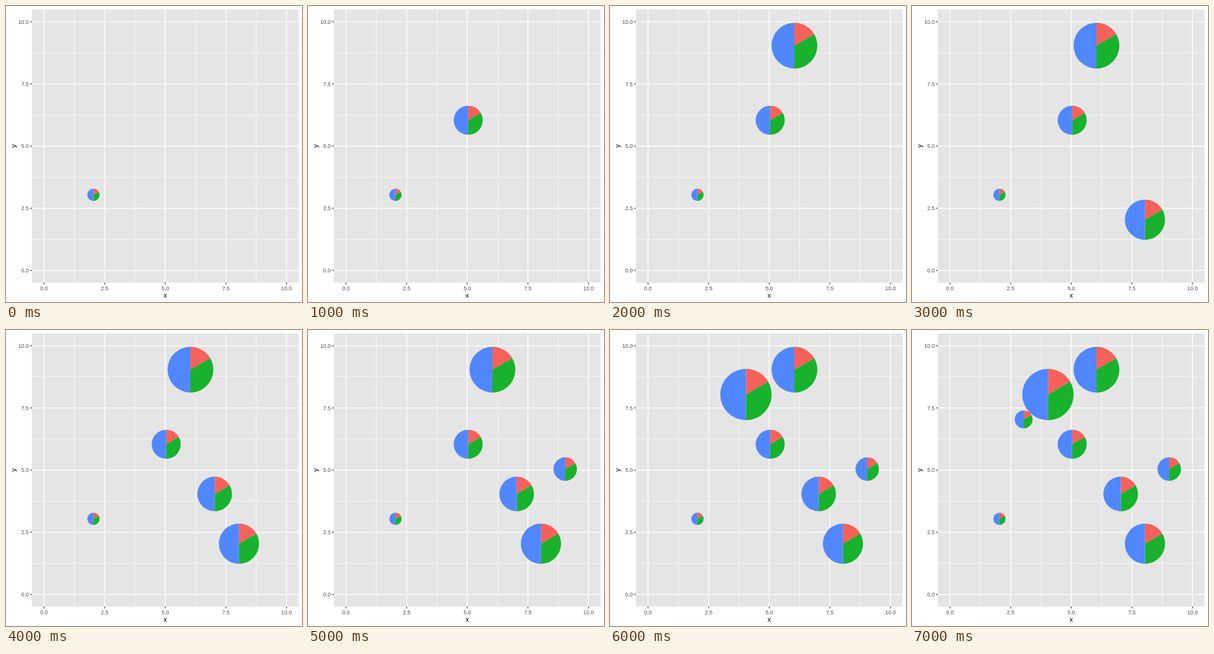
An HTML page that plays this animation: 480x480 px, repeating every 8 s.

```html
<!DOCTYPE html>
<html lang="en">
<head>
<meta charset="utf-8">
<title>Scatter of pies</title>
<style>
  html, body { margin: 0; width: 100%; height: 100%; overflow: hidden; background: #fff; }
  svg { display: block; width: 100vw; height: 100vh; }
  text { font-family: "Liberation Sans", Arial, sans-serif; font-size: 8.8px; fill: #4d4d4d; }
  .title { font-size: 11px; fill: #000; text-anchor: middle; }
</style>
</head>
<body>
<svg id="plot" viewBox="0 0 480 480"></svg>
<script>
const STEP = 1000;
const panel = { left: 42, top: 5.5, right: 474.5, bottom: 448.6 };
const plot = document.getElementById("plot");

// [x, y, size], in order of appearance
const points = [
  [2, 3, 1], [5, 6, 4], [6, 9, 7], [8, 2, 6],
  [7, 4, 5], [9, 5, 3], [4, 8, 8], [3, 7, 2]
];
const slices = [
  [0, 1 / 6, "#f6615a"], [1 / 6, 1 / 2, "#18b22d"], [1 / 2, 1, "#5087ff"]
];

const toX = x => 61.6 + 39.33 * x;
const toY = y => 428.8 - 40.32 * y;

function add(parent, tag, attrs, text = "") {
  const node = document.createElementNS("http://www.w3.org/2000/svg", tag);
  for (const key in attrs) node.setAttribute(key, attrs[key]);
  node.textContent = text;
  return parent.appendChild(node);
}

function line(d, stroke, width) {
  add(plot, "path", { d, stroke, "stroke-width": width });
}

function gridLines(value, width) {
  line(`M${panel.left} ${toY(value)}H${panel.right}`, "#fff", width);
  line(`M${toX(value)} ${panel.top}V${panel.bottom}`, "#fff", width);
}

function drawAxes() {
  add(plot, "rect", {
    x: panel.left, y: panel.top, fill: "#e5e5e5",
    width: panel.right - panel.left, height: panel.bottom - panel.top
  });
  for (let v = 1.25; v < 10; v += 2.5) gridLines(v, 0.75);
  for (let v = 0; v <= 10; v += 2.5) {
    gridLines(v, 1.4);
    line(`M${panel.left - 2.8} ${toY(v)}H${panel.left}`, "#333", 1.2);
    line(`M${toX(v)} ${panel.bottom}v2.8`, "#333", 1.2);
    const label = v.toFixed(1);
    add(plot, "text", { x: 37, y: toY(v) + 3.2, "text-anchor": "end" }, label);
    add(plot, "text", { x: toX(v), y: 461, "text-anchor": "middle" }, label);
  }
  add(plot, "text", { x: 258.2, y: 473, class: "title" }, "x");
  add(plot, "text", { transform: "translate(15.5 227) rotate(-90)", class: "title" }, "y");
}

function drawPie([x, y, size]) {
  const radius = 5.4 + 4.53 * size;
  const pie = add(plot, "g", {
    transform: `translate(${toX(x) + 1.5} ${toY(y) - 1.6})`
  });
  const rim = turn => {
    const angle = turn * 2 * Math.PI;
    return `${radius * Math.sin(angle)} ${-radius * Math.cos(angle)}`;
  };
  for (const [from, to, fill] of slices) {
    add(pie, "path", {
      d: `M0 0L${rim(from)}A${radius} ${radius} 0 0 1 ${rim(to)}Z`, fill
    });
  }
  return pie;
}

drawAxes();
const pies = points.map(drawPie);
const start = performance.now();

function render() {
  const elapsed = Math.max(0, performance.now() - start);
  const newest = Math.floor(elapsed / STEP) % pies.length;
  pies.forEach((pie, i) => pie.setAttribute("visibility", i <= newest ? "visible" : "hidden"));
  requestAnimationFrame(render);
}
render();
</script>
</body>
</html>
```
